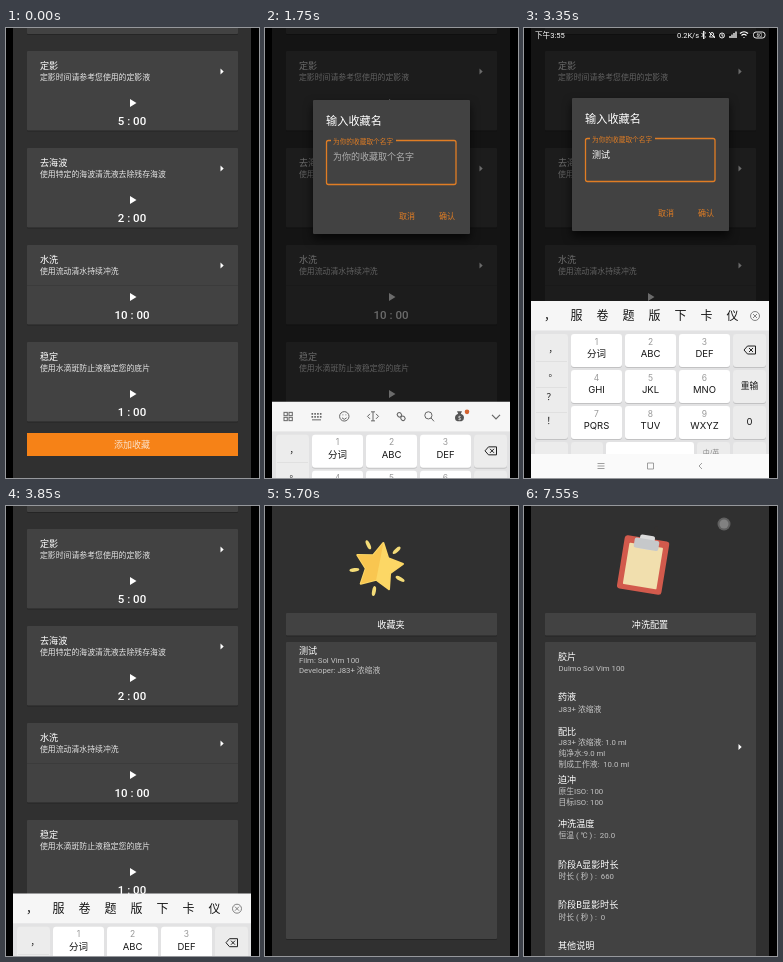
An HTML page for the animation above (7.6 s loop, 253 by 450 pixels).

```html
<!DOCTYPE html>
<html lang="zh-CN">
<head>
<meta charset="utf-8">
<style>
html, body { margin: 0; width: 100%; height: 100%; overflow: hidden; background: #000; }
svg { display: block; width: 253px; height: 450px; }
text { font-family: Roboto, 'Noto Sans CJK SC', 'Noto Sans CJK', sans-serif; white-space: pre; }
#keyboard text { font-family: Inter, 'Noto Sans CJK SC', 'Noto Sans CJK', sans-serif; }
#box { filter: drop-shadow(0 5px 5px #000a); }
</style>
</head>
<body>
<svg id="stage" viewBox="0 0 253 450"></svg>
<script>
const LOOP = 7600, ORANGE = '#f68217', CARD = '#424242', PAGE = '#303030';

// Markup helpers; text is placed by its vertical centre.
const rect = (x, y, w, h, fill, more = '') =>
  `<rect x="${x}" y="${y}" width="${w}" height="${h}" fill="${fill}" ${more}/>`;
const text = (x, y, s, size, fill = '#fff', more = '') =>
  `<text x="${x}" y="${y + size * .36}" font-size="${size}" fill="${fill}" ${more}>${s}</text>`;
const mid = (x, y, s, size, fill, more = '') => text(x, y, s, size, fill, 'text-anchor="middle" ' + more);
const path = (d, fill, more = '') => `<path d="${d}" fill="${fill}" ${more}/>`;
const line = (d, color, w = 1) => path(d, 'none', `stroke="${color}" stroke-width="${w}"`);
const group = (id, body, more = '') => `<g id="${id}" ${more}>${body}</g>`;
const panel = (y, h) => rect(21, y + 1, 211, h, '#252525', 'rx="1"') + rect(21, y, 211, h, CARD, 'rx="1"');
const arrow = y => path(`M214.500 ${y - 3}l3.2 3-3.2 3z`, '#fff');

function step(y, title, note, time, more) {
  return panel(y, 79.5) + text(34, y + 15, title, 9.1) + text(34, y + 26.5, note, 7.87, '#e4e4e4') +
    (more ? arrow(y + 20.5) : '') + path(`M124 ${y + 48}l6.5 4-6.5 4z`, '#fff') +
    mid(126, y + 69.5, time, 11.5, '#fff', 'font-weight="500"');
}

const home = rect(7, 0, 238, 450, PAGE) + panel(-70, 76) +
  step(23, '定影', '定影时间请参考您使用的定影液', '5 : 00', true) +
  step(120, '去海波', '使用特定的海波清洗液去除残存海波', '2 : 00', true) +
  step(217, '水洗', '使用流动清水持续冲洗', '10 : 00', true) +
  rect(21, 257, 211, .7, '#383838') +
  step(314, '稳定', '使用水滴斑防止液稳定您的底片', '1 : 00') +
  rect(21, 405, 211, 23, ORANGE) + mid(126, 417, '添加收藏', 9, '#fbe3cc');

const snack = rect(7, 423.5, 238, 27, PAGE) +
  text(21.5, 437, '已加入收藏夹, 文件名测试', 7.7) + text(216, 437, '查看', 7.7, '#ddd');

// Star with five rays
function star() {
  const pt = i => {
    const a = i * Math.PI / 5, r = i % 2 ? 13 : 24.5;
    return (r * Math.sin(a)).toFixed(1) + ' ' + (-r * Math.cos(a)).toFixed(1);
  };
  const shape = (from, to) => 'M' + Array.from({ length: to - from + 1 }, (_, i) => pt(from + i)).join('L') + 'z';
  let s = '';
  for (let a = 36; a < 360; a += 72)
    s += `<ellipse cy="-24.5" rx="1.9" ry="5" fill="#f4dc78" transform="rotate(${a})"/>`;
  return s + path(shape(0, 9), '#fcd765', 'stroke="#fcd765" stroke-width="2" stroke-linejoin="round"') +
    path(shape(5, 10), '#f9c650');
}

const favourites = rect(7, 0, 238, 450, PAGE) + panel(107, 22.5) + mid(126, 119, '收藏夹', 9.1) + panel(136, 297) +
  group('ripple', rect(21, 136, 211, 37, '#fff')) +
  group('entry', text(34, 144.5, '测试', 9.1) + text(34, 154.5, 'Film: Sol Vim 100', 7.8, '#c4c4c4') +
    text(34, 164.5, 'Developer: J83+ 浓缩液', 7.8, '#c4c4c4')) +
  group('star', star());

const fields = [
  [151, '胶片', [11, 'Dulmo Sol Vim 100']],
  [191, '药液', [12, 'J83+ 浓缩液']],
  [225.5, '配比', [11, 'J83+ 浓缩液: 1.0 ml'], [22, '纯净水:9.0 ml'], [32.5, '制成工作液:  10.0 ml']],
  [273.5, '迫冲', [11.5, '原生ISO: 100'], [22.5, '目标ISO: 100']],
  [318, '冲洗温度', [11.5, '恒温 ( ℃ ) :  20.0']],
  [358.5, '阶段A显影时长', [12, '时长 ( 秒 ) :  660']],
  [399, '阶段B显影时长', [12, '时长 ( 秒 ) :  0']],
  [440, '其他说明']
];
const config = rect(7, 0, 238, 450, PAGE) + panel(107, 22.5) + mid(126, 119, '冲洗配置', 9.1) + panel(136, 320) +
  fields.map(([y, title, ...notes]) => text(34, y, title, 9.1) +
    notes.map(([dy, s]) => text(34.5, y + dy, s, 7.8, '#c4c4c4')).join('')).join('') +
  arrow(241) + '<clipPath id="frame"><path d="M21 0h211v106h-211z"/></clipPath>' +
  `<g clip-path="url(#frame)">${group('board', '')}</g>`;

const dialog = rect(48, 70, 157, 133, CARD, 'id="box" rx="1"') +
  text(61, 91, '输入收藏名', 11.2) +
  rect(61.5, 110.5, 129.5, 43, 'none', 'id="field" rx="2" stroke-width="1.3"') +
  group('label', rect(66, 109, 65, 4, CARD) + text(68, 112, '为你的收藏取个名字', 6.7, '#e07d24')) +
  group('hint', text(68, 127, '为你的收藏取个名字', 9, '#b0b0b0')) +
  text(68, 127, '', 9, '#fff', 'id="typed"') +
  group('actions', text(134, 185, '取消', 8, '#e07d24') + text(174, 185, '确认', 8, '#e07d24'));

// Keyboard
const key = (x, y, w, h, fill = '#fff') =>
  rect(x, y + 1, w, h, '#c2c2c3', 'rx="3"') + rect(x, y, w, h, fill, 'rx="3"');
const GREY = '#ececec', INK = '#161616';
function keyboard() {
  let s = rect(7, 273, 238, 180, '#e2e2e3') + rect(7, 273, 238, 29.5, '#f6f6f6') + key(11, 306, 33, 105, GREY);
  [...'，。？！'].forEach((c, i) => {
    s += mid(i < 2 ? 29 : 27, 321 + 24 * i, c, 9, INK);
    if (i) s += rect(12, 308 + 25.5 * i, 31, .5, '#d3d3d3');
  });
  ['分词', 'ABC', 'DEF', 'GHI', 'JKL', 'MNO', 'PQRS', 'TUV', 'WXYZ'].forEach((name, i) => {
    const x = 47 + 54 * (i % 3), y = 306 + 36 * Math.floor(i / 3);
    s += key(x, y, 51, 33) + mid(x + 25.5, y + 7.5, i + 1, 8.5, '#999') + mid(x + 25.5, y + 19.5, name, 9.5, INK);
  });
  for (let i = 0; i < 3; i++) s += key(209, 306 + 36 * i, 33, 33, GREY);
  s += line('M220 322l3.5-4h8v8h-8zM225 320l4 4m0-4l-4 4', '#222') +
    mid(225.5, 358, '重输', 8.8, INK, 'font-weight="500"') + mid(225.5, 394, '0', 9.5, INK);
  [[11, 33], [47, 32], [82, 88], [173, 33], [209, 33]].forEach(([x, w], i) =>
    s += key(x, 414, w, 33, i == 2 ? '#fff' : GREY));
  return s + mid(187, 424, '中/英', 7, '#888') + group('tools', tools()) + group('words', '');
}
function tools() {
  const c = '#666';
  let s = '';
  for (let i = 0; i < 4; i++)
    s += rect(19 + 5 * (i % 2), 283.5 + 5 * (i >> 1), 3.3, 3.3, 'none', `stroke="${c}"`);
  for (const y of [285, 288])
    s += `<path d="M46.500 ${y}h10" stroke="${c}" stroke-width="1.6" stroke-dasharray="1.6 1.2"/>`;
  for (const x of [-4.5, .5])
    s += rect(x, -2, 4.5, 4, 'none', `rx="2" stroke="${c}" stroke-width="1.100" transform="translate(136 287.500) rotate(45)"`);
  return s + line('M47 291h9M84 287.5a4.7 4.7 0 1 1-9.4 0a4.7 4.7 0 1 1 9.4 0M77 289q2.3 3 4.6 0M77.5 286h.8m2.2 0h.8', c) +
    line('M108 283v9m-2-9h4m-4 9h4M105 285l-2.5 2.5 2.5 2.5M111 285l2.5 2.5-2.5 2.5', c) +
    line('M167 286.5a3.6 3.6 0 1 1-7.2 0a3.6 3.6 0 1 1 7.2 0M166 289l3 3.5', c) +
    path('M192 282.5h5l-1.200 2.500q3.200 1.200 3.200 4t-2.500 3.500h-4q-2.500-.5-2.500-3.500t3.200-4z', '#555') +
    mid(194.5, 289, '$', 5, '#fff') +
    '<circle cx="202" cy="283" r="2.3" fill="#d4622f"/>' + line('M227 286l4 4 4-4', c, 1.2);
}
const nav = rect(7, 426, 238, 24, '#fafafa') +
  line('M73.5 435.5h7m-7 2.5h7m-7 2.5h7M123.5 435h6v6h-6zM178 435l-3 3 3 3', '#888', .8);
const status = text(11, 7, '下午3:55', 7.6) + text(153, 7, '', 7.5, '#fff', 'id="speed"') +
  line('M177.5 5l4 4-2 2v-8l2 2-4 4M185.5 9h5q-1-1-1-3a1.5 1.5 0 0 0-3 0q0 2-1 3M185 4l6 6' +
    'M200.5 7.5a2.5 2.5 0 1 1-5 0a2.5 2.5 0 1 1 5 0M198 6v2h1.5', '#fff', .9) +
  line('M206 10v-2m2 2v-3.500m2 3.500v-5m2 5v-6.500', '#fff', 1.300) +
  line('M216 5.500q4-3.500 8 0m-6.500 2q2.500-2.200 5 0m-3 2h1', '#fff', 1.200) +
  rect(229.5, 4, 11.5, 6, 'none', 'stroke="#fff" stroke-width=".9" rx="2.5"') + mid(235.2, 7, '60', 5, '#fff');

document.getElementById('stage').innerHTML = group('home', home) + group('snack', snack) +
  group('favourites', favourites) + group('config', config) +
  group('dim', rect(7, 0, 238, 450, '#000')) + group('dialog', dialog) +
  group('keyboard', keyboard()) + group('nav', nav) + group('status', status) +
  group('touch', '<circle r="6.5" fill="#aaa" opacity=".4"/><circle r="4.5" fill="#ccc" opacity=".3"/>') +
  rect(0, 0, 7, 450, '#000') + rect(245, 0, 8, 450, '#000');

const el = {};
document.querySelectorAll('[id]').forEach(n => el[n.id] = n);
const set = (id, name, value) => el[id].setAttribute(name, value);
const alpha = (id, v) => set(id, 'opacity', +v);
const move = (id, x, y, turn = 0) => set(id, 'transform', `translate(${x} ${y}) rotate(${turn})`);
const ramp = (t, a, b) => {
  const u = Math.min(1, Math.max(0, (t - a) / (b - a)));
  return u * u * (3 - 2 * u);
};

// Start time and place of each tap
const taps = [[400, 126, 417], [1250, 120, 212], [2150, 126, 322], [2450, 181, 322], [2800, 72, 392],
  [2950, 72, 358], [3100, 72, 358], [3200, 32, 288], [3600, 182, 185], [4800, 222, 435],
  [6250, 80, 155], [7450, 200, 18]];
// Time, text in the field, suggestions
const typing = [[0, '', ''], [2200, 'a', '啊 阿 不 把 吧 从 才'], [2500, 'ce', '测 册 策 侧 厕 被 北'],
  [2850, "ce's", '测 册 策 侧 厕 测速'], [3000, "ce'sh", '测试 测 册 策 侧 厕'],
  [3150, "ce'shi", '测试 侧视 侧室 测 册'], [3250, '测试', '， 服 卷 题 版 下 卡 仪']];
let shown;

function suggest(words) {
  let x = 17;
  return words.split(' ').map(w => {
    const s = text(x + (w == '，' ? 3 : 0), 288, w, 12, INK);
    x += 14 + 12 * w.length + (w == '，' ? 3.5 : 0);
    return s;
  }).join('') + line('M235.5 288a4.5 4.5 0 1 1-9 0a4.5 4.5 0 1 1 9 0M229 286l4 4m0-4l-4 4', '#777', .9);
}

// Pictures slide in from the left with a damped swing
function swing(id, t, start, y) {
  const d = Math.max(0, t - start);
  move(id, 126 - 78 * Math.exp(-d * .00303), y, -20 * Math.exp(-d / 1200) * Math.cos(Math.PI * d / 700));
  return Math.exp(-d * .006);
}

function drawBoard(q) {
  const box = (w, h, fill, x, y, r) => rect(x - w / 2, y - h / 2, w, h, fill, `rx="${r}"`);
  const w = 25 - 15 * q, h = 10 + 15 * q, y = -21 + q;
  el.board.innerHTML = box(45 + 3 * q, 54 - 5 * q, '#d25a4c', 0, -1.5 * q, 3) +
    box(34 + 3 * q, 42 - 4 * q, '#f1dfae', 0, 1 - q, 1) +
    `<g opacity="${q}">${box(4, 9, '#c8503f', 7, -36, 1)}</g>` +
    box(w * .6, h + 4, '#dcdcdc', 5 * q, y - 2, 2) + box(w, h, '#c6c8ca', 5 * q, y, 2);
}

function draw(t) {
  const open = ramp(t, 500, 650) * (1 - ramp(t, 3650, 3800));
  const bars = t >= 1850 && t < 3700, extra = t < 1850 ? 1 : 0, focus = t >= 1350;
  alpha('dim', .58 * open);
  alpha('dialog', open);
  move('dialog', 0, 84 * (1 - ramp(t, 1500, 1700)) + 2 * extra);
  set('box', 'height', 133 + extra);
  set('field', 'height', 43 + extra);
  set('field', 'stroke', focus ? '#e07d24' : '#888');
  move('actions', 0, extra);
  alpha('label', focus);

  const now = typing.filter(s => s[0] <= t).pop();
  if (now != shown) {
    shown = now;
    el.typed.textContent = now[1];
    set('typed', 'text-decoration', now[1] > 'z' ? 'none' : 'underline');
    alpha('hint', !now[1]);
    alpha('tools', !now[2]);
    el.words.innerHTML = now[2] ? suggest(now[2]) : '';
  }
  move('keyboard', 0, 177 * (1 - ramp(t, 1614, 1914) + ramp(t, 3700, 3950)));
  alpha('nav', bars);
  alpha('status', bars);
  el.speed.textContent = t < 2400 ? '1.4K/s' : t < 3000 ? '0.8K/s' : '0.2K/s';

  move('snack', 0, 28 * (1 - ramp(t, 4150, 4350)));
  alpha('favourites', ramp(t, 4900, 5100));
  alpha('entry', ramp(t, 5100, 5350));
  alpha('ripple', .1 * ramp(t, 6250, 6350) * (1 - ramp(t, 6450, 6600)));
  alpha('config', ramp(t, 6550, 6800));
  swing('star', t, 5091, 61);
  drawBoard(swing('board', t, 6750, 59));

  const tap = taps.find(([s]) => t >= s && t < s + 120);
  alpha('touch', !!tap);
  if (tap) move('touch', tap[1], tap[2]);
}

const begin = performance.now();
function tick() {
  const t = (performance.now() - begin) % LOOP;
  draw(Math.floor(t / 50) * 50);
  requestAnimationFrame(tick);
}
tick();
</script>
</body>
</html>
```
